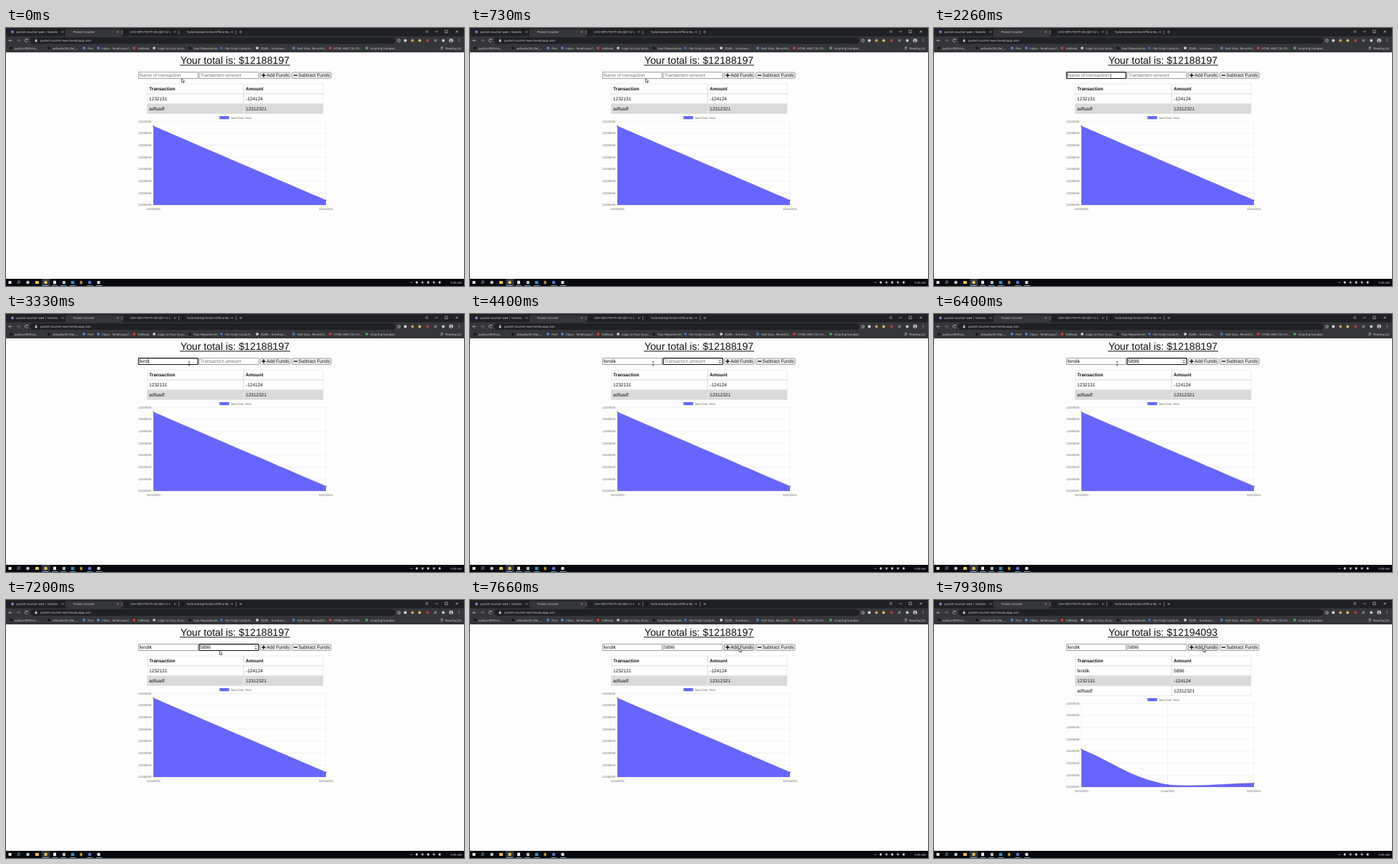
Write an HTML page that moves like this. It is 640x360 px and loops after 8000 ms.

```html
<!DOCTYPE html>
<html lang="en">
<head>
<meta charset="utf-8">
<title>Pocket Counter</title>
<style>
  html, body { margin: 0; width: 100%; height: 100%; overflow: hidden; background: #fdfdfd; }
  svg { display: block; width: 640px; height: 360px; text-rendering: geometricPrecision; }
  text { font-family: "Liberation Sans", Arial, sans-serif; font-size: 6.5px; fill: #111; white-space: pre; }
  .ui { font-family: "Open Sans", "Noto Sans", sans-serif; font-size: 4.2px; fill: #d4d5d8; }
  .axis { font-size: 4.1px; fill: #666; }
  .bold { font-weight: bold; }
  .hint { fill: #777; }
  .end { text-anchor: end; }
  .mid { text-anchor: middle; }
  .line { fill: none; stroke: #d4d5d8; stroke-width: .6; }
</style>
</head>
<body>
<svg viewBox="0 0 640 360">
  <rect width="640" height="360" fill="#fdfdfd"/>
  <g id="chrome"></g>
  <text id="total" class="mid" x="320" y="50" style="font-size:14.2px"></text>
  <rect id="totalLine" x="243" y="51.4" width="154" height="1" fill="#111"/>
  <g id="form"></g>
  <g id="table"></g>
  <g id="chart"></g>
  <g id="taskbar"></g>
  <g id="mouse">
    <path id="arrow" d="M0 0V5.4L1.3 4.3L2.2 6.2L3.1 5.8L2.3 3.9H4Z" fill="#fff" stroke="#111" stroke-width=".6"/>
    <path id="beam" d="M-1.1 -2.7H1.1M0 -2.7V2.7M-1.1 2.7H1.1" fill="none" stroke="#222" stroke-width=".65"/>
  </g>
</svg>
<script>
const LOOP = 8000;
const NAME = 'fendik', AMOUNT = '5896';
const KEYS_NAME = [2930, 3060, 3130, 3330, 3460, 3530];
const KEYS_AMOUNT = [5400, 5930, 6200, 6400];
const CLICK = 2260, TAB = 3860, PRESS = 7600, SAVED = 7800;

const $ = id => document.getElementById(id);
const text = (x, y, s, cls = '') => `<text x="${x}" y="${y}" class="${cls}">${s}</text>`;
const box = (x, y, w, h, fill, more = '') =>
  `<rect x="${x}" y="${y}" width="${w}" height="${h}" fill="${fill}" ${more}/>`;
const dot = (x, y, r, fill) => `<circle cx="${x}" cy="${y}" r="${r}" fill="${fill}"/>`;
const stroke = (d, more = '') => `<path class="line" d="${d}" ${more}/>`;
const cross = (x, y, r) => stroke(`M${x - r} ${y - r}L${x + r} ${y + r}M${x + r} ${y - r}L${x - r} ${y + r}`);

function drawBrowser() {
  let s = box(0, 0, 640, 34, '#35363a') + box(0, 0, 640, 11.5, '#202124') +
    box(83, 1.5, 79, 10.5, '#35363a', 'rx="2"') +
    box(34, 13, 510, 9, '#202124', 'rx="4.5"');
  const tabs = [
    [9, '#8a78c8', 'pocket-counter-wee | Nubelo', 79],
    [88, '', 'Pocket Counter', 156],
    [168, '#17181a', 'UTA-VIRT-FSF-PT-08-2021-U-L', 236],
    [247, '#17181a', 'TorbinHaleq/Online-Offline-Bu', 316]
  ];
  for (const [x, color, label, close] of tabs) {
    if (color) s += dot(x, 5.5, 2, color);
    s += text(color ? x + 5.5 : 94, 7, label, 'ui') + cross(close, 5.5, 1);
  }
  s += stroke('M326 5.5H330M328 3.5V7.5M162.5 3V9M241.5 3V9M321.5 3V9', 'opacity=".7"');
  s += dot(588, 5, 2.2, '#55565a') + stroke('M599.5 5H603.5M613.5 3.2H617V6.8H613.5Z') + cross(630, 5, 1.7);

  s += stroke('M8.5 17.5H4M6 15.5L4 17.5L6 19.5') +
    stroke('M15 17.5H19.5M17.5 15.5L19.5 17.5L17.5 19.5', 'opacity=".5"') +
    stroke('M30 16A2.1 2.1 0 1 0 30.3 18.2M30.3 14.8V16.4H28.7') +
    box(40.6, 17, 2.8, 2.3, '#d4d5d8') + stroke('M41.2 17V16A.8 .8 0 0 1 42.8 16V17') +
    text(48, 19, 'pocket-counter-wee.herokuapp.com', 'ui');
  s += stroke('M549 15.2L549.7 16.8L551.4 17L550.1 18.1L550.5 19.8L549 18.9L547.5 19.8L547.9 18.1L546.6 17L548.3 16.8Z');
  [[558, '#d8d9db'], [568, '#d8a53a'], [578, '#d4bc54'], [589, '#b3433c'], [600, '#77797d'], [611, '#c9cacc']]
    .forEach(([x, c]) => s += dot(x, 17.5, 2, c));
  s += dot(622, 17.5, 2.8, '#cfd1d4') + dot(622, 16.8, 1, '#555') + box(620.5, 18, 3, 1.8, '#555', 'rx=".9"');
  for (const y of [15.7, 17.5, 19.3]) s += dot(633, y, .5, '#d4d5d8');

  const marks = [
    [7, '#17181a', 'quillozz58/Ema...'], [60, '#17181a', 'velkudo/AA_Bot_...'],
    [109, '#4f83d6', 'Post'], [129, '#4f83d6', 'Inbox - fendik.pau7...'],
    [179, '#d83a32', 'VidNook'], [207, '#bfc1c4', 'Login to Your Acco...'],
    [257, '#17181a', 'Your Repositories'], [301, '#3f6fae', 'the Script Camp H...'],
    [351, '#c9cacc', 'ZQRIL - Summon...'], [402, '#4a79c4', 'KoR Stats, Record R...'],
    [453, '#c94035', 'HTML AND CSS Ch...'], [504, '#54a05a', 'Scripting Samples']
  ];
  for (const [x, c, label] of marks) s += dot(x, 28, 2, c) + text(x + 5, 29.5, label, 'ui');
  s += stroke('M607.5 26.5H611M607.5 28H611M607.5 29.5H610') + text(614, 29.5, 'Reading list', 'ui');
  $('chrome').innerHTML = s;
}

function drawTaskbar() {
  let s = box(0, 350, 640, 10, '#07090e') + box(50, 350, 11.5, 10, '#34383d');
  s += box(3.5, 353, 4, 4, '#e4e6e8') + '<circle class="line" cx="18" cy="354.5" r="1.7"/>' + stroke('M16.7 355.8L15.5 357.2');
  s += dot(30.5, 355, 2.3, '#b9cbe0') + box(41, 353, 5, 4, '#e8c04e', 'rx=".5"') + dot(55.5, 355, 2.3, '#d9c15c') +
    box(66, 352.7, 4, 4.6, '#e3e4e6') + box(79, 353, 4, 4.2, '#b7bdc0') + box(91, 353, 4.4, 4.2, '#2f8fd8') +
    box(103.5, 353, 3, 4.2, '#c79b43') + dot(117, 355, 2.3, '#6672e0') + dot(129.5, 355, 2.3, '#e6e7e9');
  for (const x of [51, 64, 76, 89, 113, 126]) s += box(x, 359.2, 8.5, .8, '#76b9ed');
  s += stroke('M565 356L566.5 354.3L568 356');
  [574, 582, 590, 598, 606].forEach((x, i) => s += box(x - 1.4, 353.6, 2.8, 2.8, i % 2 ? '#a8abb0' : '#d4d5d8', 'rx=".6"'));
  s += text(637, 356.5, '9:59 AM', 'ui end');
  $('taskbar').innerHTML = s;
}

function drawForm(name, amount, focus, caret, hover) {
  const field = (x, value, hint, focused) => {
    let s = box(x, 61.7, 83, 8.8, '#fff', focused
      ? 'stroke="#101010" stroke-width="1.2" rx=".5"' : 'stroke="#777" stroke-width=".7"');
    s += text(x + 1.3, 68.4, value || hint, value ? '' : 'hint');
    return s;
  };
  const button = (x, w, label, icon, over) =>
    box(x, 61.9, w, 8.4, over ? '#e5e5e5' : '#efefef', `rx="1" stroke="${over ? '#4f4f4f' : '#777'}" stroke-width=".7"`) +
    `<path d="${icon}" stroke="#111" stroke-width="1.4"/>` + text(x + 8.8, 68.4, label);
  $('form').innerHTML =
    field(185.2, name, 'Name of transaction', focus === 1) +
    field(270, amount, 'Transaction amount', focus === 2) +
    (focus === 2 ? '<path d="M347.8 65.3L349.2 63.4L350.6 65.3ZM347.8 67L349.2 68.9L350.6 67Z" fill="#444"/>' : '') +
    button(355.2, 41.8, 'Add Funds', 'M357.3 66H362.7M360 63.3V68.7', hover) +
    button(399.6, 54.6, 'Subtract Funds', 'M401.8 66H407.2', false);
  if (!caret) return;
  const value = $('form').querySelectorAll('text')[focus - 1];
  const typed = focus === 1 ? name : amount;
  const x = +value.getAttribute('x') + (typed ? value.getComputedTextLength() : 0);
  $('form').innerHTML += box(x, 63.2, .45, 6, '#111');
}

function drawTable(rows) {
  const cell = (x, y, w, s, fill, cls) =>
    box(x, y, w, 13.3, fill, 'stroke="#dedede" stroke-width=".6"') + text(x + 2.7, y + 8.9, s, cls);
  $('table').innerHTML = [['Transaction', 'Amount'], ...rows].map(([a, b], i) => {
    const fill = i && i % 2 === 0 ? '#dadada' : '#fff', y = 78.1 + 14 * i, cls = i ? '' : 'bold';
    return cell(197.3, y, 134.4, a, fill, cls) + cell(332.4, y, 110.6, b, fill, cls);
  }).join('');
}

// Line chart with tension .4; grow lifts the line from the baseline.
function drawChart(values, grow, shift) {
  const L = 206, R = 447, T = 130.4, B = 247, low = 12180000, span = 140000;
  const lift = y => B + (Math.min(B, Math.max(T, y)) - B) * grow;
  const pts = values.map((v, i) => [L + (R - L) * i / (values.length - 1), B - (v - low) / span * (B - T)]);
  let s = box(298.3, 123, 13.5, 4.2, '#6666ff') + text(314, 126.5, 'Total Over Time', 'axis');
  const grid = d => `<path d="${d}" stroke="#e4e4e4" stroke-width=".5"/>`;
  for (let i = 0; i < 8; i++) {
    const y = T + (B - T) * i / 7;
    s += grid(`M203 ${y}H${R}`) + text(203, y + 1.4, low + span - 20000 * i, 'axis end');
  }
  for (const [x] of pts) s += grid(`M${x} ${T}V250`) + text(x, 253.9, '11/24/2021', 'axis mid');

  const handles = pts.map((p, i) => {
    const a = pts[i - 1] || p, b = pts[i + 1] || p;
    const d1 = Math.hypot(p[0] - a[0], p[1] - a[1]), d2 = Math.hypot(b[0] - p[0], b[1] - p[1]);
    const f1 = .4 * d1 / (d1 + d2), f2 = .4 * d2 / (d1 + d2), dx = b[0] - a[0], dy = b[1] - a[1];
    return [p[0] - f1 * dx, p[1] - f1 * dy, p[0] + f2 * dx, p[1] + f2 * dy];
  });
  let d = `M${L} ${lift(pts[0][1])}`;
  for (let i = 1; i < pts.length; i++) {
    const a = handles[i - 1], b = handles[i], p = pts[i];
    d += `C${a[2]} ${lift(a[3])} ${b[0]} ${lift(b[1])} ${p[0]} ${lift(p[1])}`;
  }
  s += `<path d="${d}V${B}H${L}Z" fill="#6666ff"/><path d="${d}" fill="none" stroke="#000" stroke-opacity=".14"/>`;
  for (const [x, y] of pts) s += `<circle cx="${x}" cy="${lift(y)}" r="1" fill="#000" fill-opacity=".4"/>`;
  $('chart').innerHTML = s;
  $('chart').setAttribute('transform', `translate(0 ${shift})`);
}

// Mouse stops: time, x, y; moves happen only where both ends differ.
const PATH = [[0, 245.5, 70.5], [2199, 245.5, 70.5], [2200, 247, 68], [2800, 247, 68], [2860, 256, 69],
  [6800, 256, 69], [7060, 284, 71.5], [7140, 284, 71.5], [7530, 376, 67.2], [LOOP, 376, 67.2]];

function mouseAt(t) {
  const i = Math.max(1, PATH.findIndex(p => p[0] >= t));
  const [t0, x0, y0] = PATH[i - 1], [t1, x1, y1] = PATH[i];
  const k = (t - t0) / (t1 - t0);
  return [x0 + (x1 - x0) * k, y0 + (y1 - y0) * k];
}

function moveMouse(x, y) {
  const overField = y < 70.4 && (x < 268 || (x > 270 && x < 353));
  $('mouse').setAttribute('transform', `translate(${x} ${y})`);
  $('beam').style.display = overField ? '' : 'none';
  $('arrow').style.display = overField ? 'none' : '';
}

const ROWS = [['1232131', '-124124'], ['adfsadf', '12312321']];
const count = (keys, t) => keys.filter(k => t >= k).length;
const last = {};
function update(part, draw, ...args) {
  const key = JSON.stringify(args);
  if (last[part] !== key) { last[part] = key; draw(...args); }
}

function render(t) {
  const saved = t >= SAVED;
  const [x, y] = mouseAt(t);
  moveMouse(x, y);

  const focus = t < CLICK || t >= PRESS ? 0 : t < TAB ? 1 : 2;
  const edit = Math.max(...[CLICK, TAB, ...KEYS_NAME, ...KEYS_AMOUNT].filter(k => k <= t), 0);
  const caret = focus > 0 && Math.floor((t - edit) / 535) % 2 === 0;
  update('form', drawForm, NAME.slice(0, count(KEYS_NAME, t)), AMOUNT.slice(0, count(KEYS_AMOUNT, t)),
    focus, caret, x > 355 && x < 397);

  update('total', v => $('total').textContent = 'Your total is: $' + v, saved ? 12194093 : 12188197);
  update('table', drawTable, saved ? [[NAME, AMOUNT], ...ROWS] : ROWS);

  const tick = t >= 7930 ? 7930 : t >= 7860 ? 7860 : SAVED;
  const grow = saved ? 1 - (1 - (tick - 7780) / 1000) ** 4 : 1;
  update('chart', drawChart, saved ? [12312321, 12188197, 12194093] : [12312321, 12188197], grow, saved ? 14 : 0);
}

drawBrowser();
drawTaskbar();
const start = performance.now();
function loop() {
  render((performance.now() - start) % LOOP);
  requestAnimationFrame(loop);
}
loop();
</script>
</body>
</html>
```
